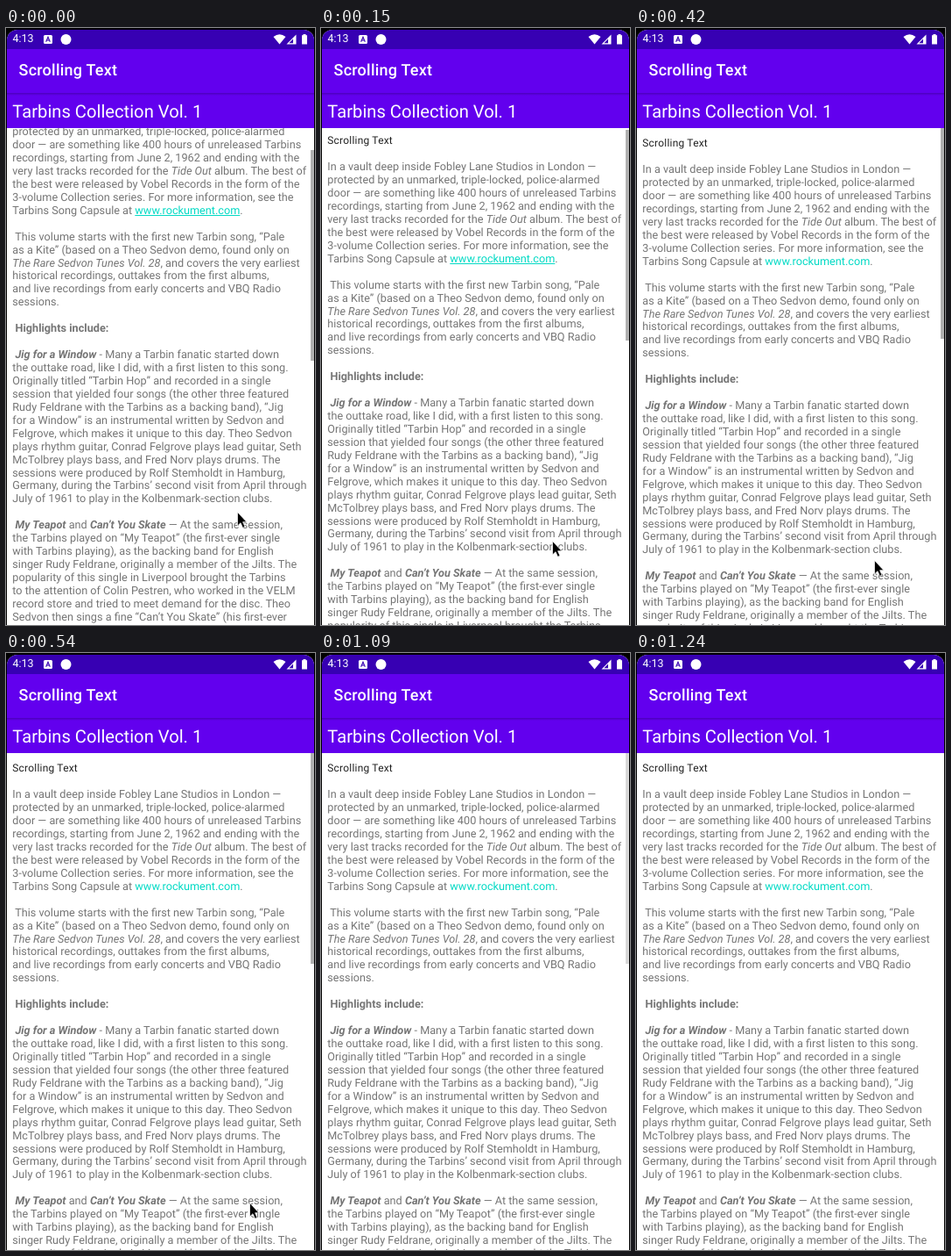
Recreate the animation shown at these times as an HTML page. Size 353 by 680 pixels, loop 1490 ms.

```html
<!DOCTYPE html>
<html lang="en">
<head>
<meta charset="utf-8">
<title>Scrolling Text</title>
<style>
  html, body { margin: 0; width: 100%; height: 100%; overflow: hidden; background: #000; }
  #stage {
    position: relative; width: 353px; height: 680px; overflow: hidden; background: #fff;
    clip-path: inset(2px 1px 0 1px round 12px 12px 0 0);
    font-family: Roboto, sans-serif; text-rendering: geometricPrecision; white-space: pre;
  }
  #stage > *, #article > * { position: absolute; }
  .bar { left: 0; width: 100%; color: #fff; box-sizing: border-box; }
  #status { top: 0; height: 24px; padding-left: 7.5px; background: #3700b3; font-size: 12.5px; line-height: 26px; }
  #title { top: 24px; height: 50px; padding-left: 14.6px; background: #6200ee; font-size: 18px; font-weight: 500; letter-spacing: .0125em; line-height: 50px; }
  #heading { top: 74px; height: 40px; padding-left: 7.3px; background: linear-gradient(#4c00bb, #6200ee 3px); font-size: 20.2px; line-height: 42px; }
  #view { top: 114px; left: 0; width: 353px; height: 566px; overflow: hidden; }
  #article { position: absolute; left: 7.3px; top: 0; }
  #intro { top: 9.5px; font-size: 12px; letter-spacing: .2px; line-height: 15px; color: #222; }
  #text { top: 41.2px; font-size: 12.7px; line-height: 14.935px; color: #757575; }
  #link { color: #03dac5; }
  #thumb { left: 348px; width: 4px; height: 240px; background: #b0b0b0; }
  svg { left: 0; top: 0; }
</style>
</head>
<body>
<div id="stage">
  <div id="view"><div id="article"><div id="intro">Scrolling Text</div><div id="text">In a vault deep inside Fobley Lane Studios in London —
protected by an unmarked, triple-locked, police-alarmed
door — are something like 400 hours of unreleased Tarbins
recordings, starting from June 2, 1962 and ending with the
very last tracks recorded for the <i>Tide Out</i> album. The best of
the best were released by Vobel Records in the form of the
3-volume Collection series. For more information, see the
Tarbins Song Capsule at <span id="link">www.rockument.com</span>.

 This volume starts with the first new Tarbin song, “Pale
as a Kite” (based on a Theo Sedvon demo, found only on
<i>The Rare Sedvon Tunes Vol. 28</i>, and covers the very earliest
historical recordings, outtakes from the first albums,
and live recordings from early concerts and VBQ Radio
sessions.

 <b>Highlights include:</b>

 <b><i>Jig for a Window</i></b> - Many a Tarbin fanatic started down
the outtake road, like I did, with a first listen to this song.
Originally titled “Tarbin Hop” and recorded in a single
session that yielded four songs (the other three featured
Rudy Feldrane with the Tarbins as a backing band), “Jig
for a Window” is an instrumental written by Sedvon and
Felgrove, which makes it unique to this day. Theo Sedvon
plays rhythm guitar, Conrad Felgrove plays lead guitar, Seth
McTolbrey plays bass, and Fred Norv plays drums. The
sessions were produced by Rolf Stemholdt in Hamburg,
Germany, during the Tarbins’ second visit from April through
July of 1961 to play in the Kolbenmark-section clubs.

 <b><i>My Teapot</i></b> and <b><i>Can’t You Skate</i></b> — At the same session,
the Tarbins played on “My Teapot” (the first-ever single
with Tarbins playing), as the backing band for English
singer Rudy Feldrane, originally a member of the Jilts. The
popularity of this single in Liverpool brought the Tarbins
to the attention of Colin Pestren, who worked in the VELM
record store and tried to meet demand for the disc. Theo
Sedvon then sings a fine “Can’t You Skate” (his first-ever</div></div></div>
  <div id="thumb"></div>
  <div class="bar" id="title">Scrolling Text</div>
  <div class="bar" id="heading">Tarbins Collection Vol. 1</div>
  <div class="bar" id="status">4:13</div>
  <svg width="353" height="680">
    <g fill="#fff">
      <rect x="43" y="8" width="10" height="10" rx="1.5"/>
      <path d="M45.7 15.8L48 10.2L50.3 15.8M46.5 14H49.5" fill="none" stroke="#3700b3" stroke-width="1.1"/>
      <circle cx="68.5" cy="13" r="6"/>
      <path d="M305.5 10Q312.5 4.5 319.5 10L312.5 18.5Z"/>
      <path d="M331.5 7.5V18.5H320.5Z"/>
      <path d="M328 12.5V17.3H323.3Z" fill="#3700b3"/>
      <path d="M338 8.3H339.5V7H342.5V8.3H344V18.5H338Z"/>
    </g>
    <path id="cursor" d="M.5 .5V16L4 12.7L6.5 18.3L9 17.2L6.6 11.7H11Z" fill="#000" stroke="#fff" stroke-width=".7"/>
  </svg>
</div>
<script>
  const LOOP = 1490;
  const $ = id => document.getElementById(id);

  // start, scroll, thumb top, thumb opacity, cursor x, cursor y (no cursor when omitted)
  const states = [
    [0, 58, 139, 1, 264, 551],
    [150, 3, 115.5, 1, 264, 584],
    [270, 0, 114, 1, 264, 584],
    [420, 0, 114, 1, 272, 606],
    [540, 0, 114, 1, 278, 626],
    [1090, 0, 114, .5],
    [1240, 0, 114, 0]
  ];

  function draw(now) {
    const time = now % LOOP;
    const [, scroll, top, opacity, x, y] = states.findLast(s => s[0] <= time);
    $('article').style.transform = `translateY(${-scroll}px)`;
    $('link').style.textDecoration = scroll ? 'underline' : 'none';
    $('thumb').style.top = top + 'px';
    $('thumb').style.opacity = opacity;
    $('cursor').style.display = x ? '' : 'none';
    if (x) $('cursor').setAttribute('transform', `translate(${x} ${y})`);
    requestAnimationFrame(draw);
  }
  draw(0);
</script>
</body>
</html>
```
